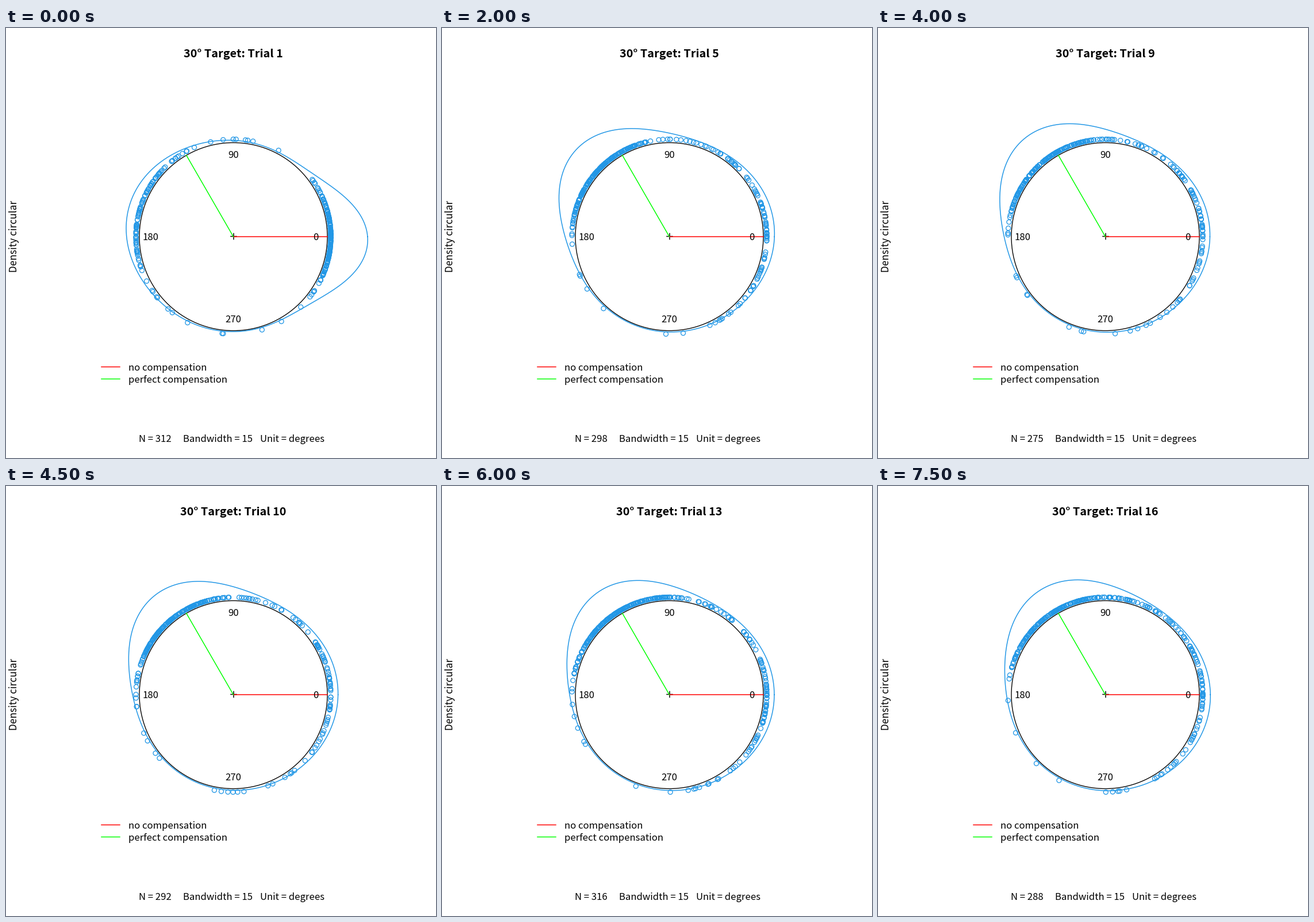
These frames come from a looping animation (748x748 px, 8 s). A matplotlib script:

```python
import matplotlib.pyplot as plt
import numpy as np
from matplotlib.animation import FuncAnimation
from matplotlib.collections import EllipseCollection
from matplotlib.patches import Circle

SIZE, DPI = 748, 100
PX = 72 / DPI
CX, CY, R = 395.5, 363, 163.5
BLUE, RED, GREEN = "#2297E6", "#ff0000", "#00ff00"
FONT = "Noto Sans CJK JP"
TRIALS = 16
BANDWIDTH = 15
BASE = 1.2
THETA = np.linspace(0, 2 * np.pi, 721)


def polar(theta, r):
    return CX + r * np.cos(theta), CY - r * np.sin(theta)


def lobes(trial):
    """Centre, height and concentration of the adapting and the zero lobe."""
    def at(*values):
        return np.interp(trial, (1, 2, 6, 16), values)

    adapted = np.radians(at(163, 149, 133, 122)), at(24, 50, 59, 49), at(3, 4.5, 4.6, 4.1)
    zero = np.radians(at(-2, 8, 8, -4)), at(69, 23, 17, 18), at(7.5, 3, 2.3, 2.2)
    return adapted, zero


def density(trial):
    return BASE + sum(h * np.exp(k * (np.cos(THETA - mu) - 1))
                      for mu, h, k in lobes(trial))


def sample_size(trial):
    return round(np.interp(trial, (1, 5, 7, 9, 11, 14, 16),
                           (312, 298, 316, 275, 310, 319, 288)))


def samples(trial):
    """Random angles whose smoothed density is the lobes' curve."""
    rng = np.random.default_rng(trial)
    adapted, zero = lobes(trial)
    mass = np.array([h * np.i0(k) * np.exp(-k) for _, h, k in (adapted, zero)]
                    + [BASE / 2])
    pick = rng.choice(3, sample_size(trial), p=mass / mass.sum())
    mu = np.array([adapted[0], zero[0], 0])[pick]
    k = np.array([adapted[2], zero[2], 0])[pick]
    return rng.vonmises(mu, k / (1 - k / BANDWIDTH))


fig = plt.figure(figsize=(SIZE / DPI, SIZE / DPI), dpi=DPI, facecolor="white")
ax = fig.add_axes([0, 0, 1, 1])
ax.set_xlim(0, SIZE)
ax.set_ylim(SIZE, 0)
ax.axis("off")


def label(x, y, text, size=16.7, **kw):
    return ax.text(x, y, text, fontsize=size * PX, family=FONT, va="baseline",
                   color="black", zorder=6, **kw)


def line(xs, ys, color, z=4):
    return ax.plot(xs, ys, color=color, lw=1.5 * PX, zorder=z, snap=False)[0]


ax.add_patch(Circle((CX, CY), R, fill=False, ec="black", lw=1.35 * PX, zorder=1))
dots = EllipseCollection(
    [7.9], [7.9], [0], units="xy", offsets=np.zeros((1, 2)),
    offset_transform=ax.transData, facecolors="none", edgecolors=BLUE,
    linewidths=1.3 * PX, zorder=2)
ax.add_collection(dots)
curve = line([], [], BLUE, z=3)

line([CX - 4.5, CX + 5.5], [CY - 0.5] * 2, "black")
line([CX + 0.5] * 2, [CY - 5.5, CY + 4.5], "black")
for angle, color in [(0, RED), (120, GREEN)]:
    x, y = polar(np.radians(angle), R)
    line([CX, x], [CY, y], color)

for angle in (0, 90, 180, 270):
    x, y = polar(np.radians(angle), 143.5)
    label(x, y + 6, str(angle), ha="center")

for y, color, text in [(589.5, RED, "no compensation"),
                       (610.5, GREEN, "perfect compensation")]:
    line([166, 198], [y, y], color)
    label(213, y + 6.5, text)

label(19.5, 362, "Density circular", 17.2, ha="center", rotation=90,
      rotation_mode="anchor")
title = label(395.5, 51, "", 19.8, ha="center", weight="bold")
total = label(231, 720.5, "")
label(308, 720.5, f"Bandwidth = {BANDWIDTH}")
label(442, 720.5, "Unit = degrees")


def draw(i):
    trial = i + 1
    curve.set_data(polar(THETA, R + density(trial)))
    dots.set_offsets(np.column_stack(polar(samples(trial), 169.5)))
    title.set_text(f"30° Target: Trial {trial}")
    total.set_text(f"N = {sample_size(trial)}")
    return curve, dots, title, total


anim = FuncAnimation(fig, draw, frames=TRIALS, interval=500,
                     repeat=True, repeat_delay=0, blit=False)
plt.show()
```
